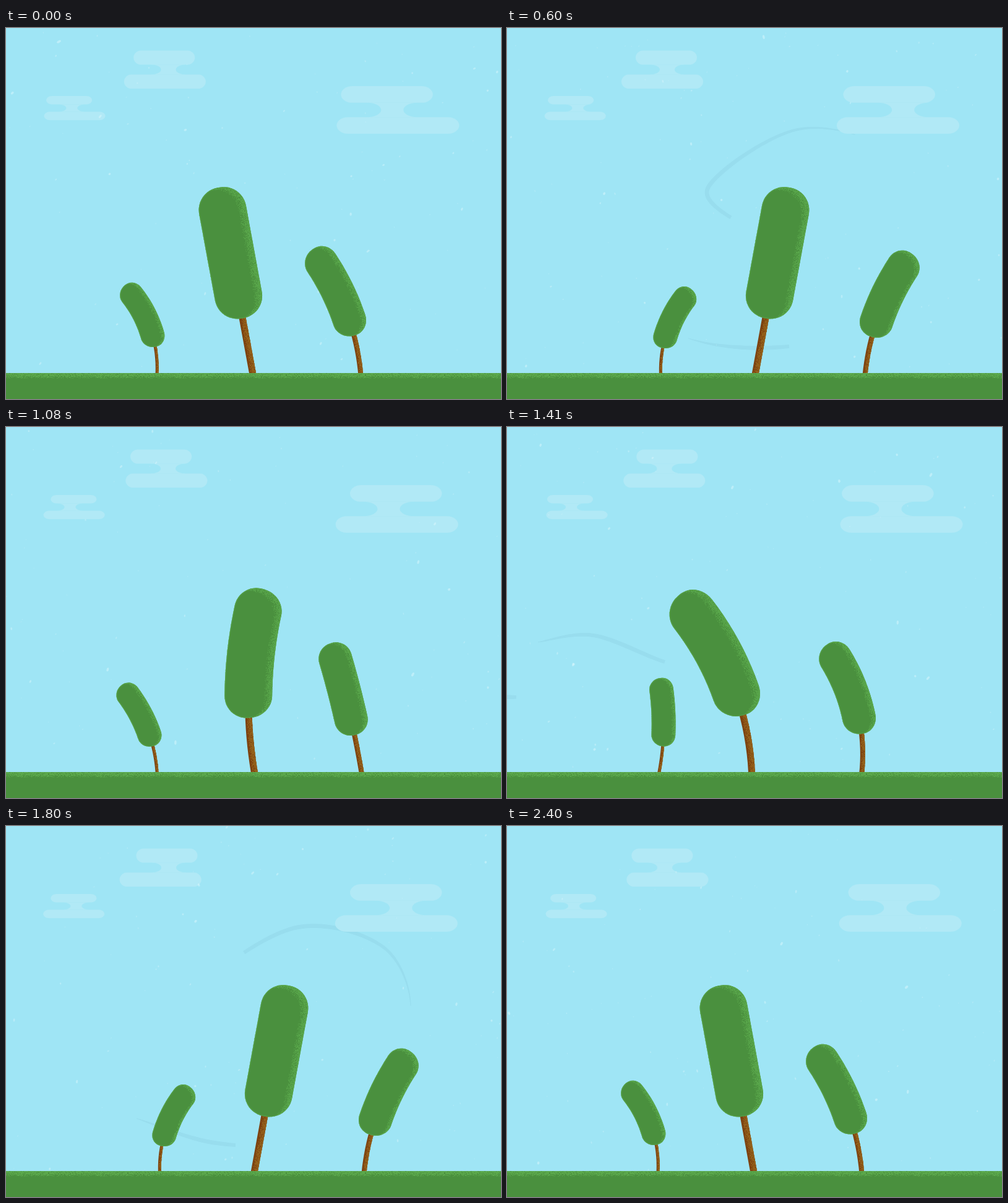
An HTML page with a canvas for the animation above (2.43 s loop, 800 by 600 pixels).

```html
<!DOCTYPE html>
<html lang="en">
<head>
<meta charset="utf-8">
<title>Trees in the wind</title>
<style>
html, body { margin: 0; width: 100%; height: 100%; overflow: hidden; background: #9fe5f5; }
canvas { display: block; width: 800px; height: 600px; }
</style>
</head>
<body>
<canvas id="stage" width="800" height="600"></canvas>
<script>
const ctx = document.getElementById('stage').getContext('2d');
const LOOP = 2430, STEP = 30, SWAY = 1200, GUST = 1270, DUST_HOLD = 120, HORIZON = 558;
const SKY = '#9fe5f5', CLOUD = '#b1e9f6', WIND = '#98ddee';
const GREEN = '#4a903e', LIGHT = '#5ba84c', BARK = '#7d4210', BARK_LIGHT = '#93601a';
const RAD = Math.PI / 180, TAU = 2 * Math.PI;

function rng(seed) {
  let a = seed * 7919 + 17;
  return () => {
    a = (a + 0x6d2b79f5) | 0;
    let n = Math.imul(a ^ (a >>> 15), 1 | a);
    n = (n + Math.imul(n ^ (n >>> 7), 61 | n)) ^ n;
    return ((n ^ (n >>> 14)) >>> 0) / 4294967296;
  };
}

function polygon(pts) {
  const p = new Path2D();
  for (const [x, y] of pts) p.lineTo(x, y);
  p.closePath();
  return p;
}

// Grain tiles: sparse one-pixel dots that build up when layered.
function grain(color) {
  return Array.from({ length: 10 }, (_, i) => {
    const tile = document.createElement('canvas'), rand = rng(i + 1);
    tile.width = tile.height = 128;
    const g = tile.getContext('2d');
    g.fillStyle = color;
    for (let y = 0; y < 128; y++)
      for (let x = 0; x < 128; x++)
        if (rand() < 0.2) g.fillRect(x, y, 1, 1);
    return ctx.createPattern(tile, 'repeat');
  });
}
const leafGrain = grain(LIGHT), barkGrain = grain(BARK_LIGHT);

// Clouds: top bar, bottom bar and neck each drift on their own wave.
const wave = (mid, amp, period, peak) => t => mid + amp * Math.cos(TAU * (t - peak) / period);
const driftA = { top: wave(5, 7.5, 735, 1065), bottom: wave(-1, 4.5, 1150, 270), neck: wave(1, 13, 1520, 470) };
const driftB = { top: wave(8, 9, 1300, 330), bottom: wave(-10.5, 7.5, 1300, 1080), neck: wave(3.5, 8, 1060, 890) };
const clouds = [
  { x: 543.5, y: 94, sx: 1, sy: 1, thick: 26.8, drift: driftA },
  { x: 201, y: 36.5, sx: 0.667, sy: 0.8, thick: 28.5, drift: driftB },
  { x: 66, y: 110, sx: 0.5, sy: 0.506, thick: 26.8, drift: driftA }
];

function bar(x, y, w, h) {
  const rx = 18, ry = h / 2;
  ctx.beginPath();
  ctx.ellipse(x + rx, y + ry, rx, ry, 0, TAU / 4, TAU * 0.75);
  ctx.ellipse(x + w - rx, y + ry, rx, ry, 0, -TAU / 4, TAU / 4);
  ctx.fill();
}

function drawCloud({ x, y, sx, sy, thick, drift }, t) {
  const neck = 66.5 + drift.neck(t), ry = 38.7 - thick;
  ctx.save();
  ctx.translate(x, y);
  ctx.scale(sx, sy);
  ctx.fillStyle = CLOUD;
  bar(drift.top(t), 0, 148.5, thick);
  bar(drift.bottom(t) - 8.5, 77 - thick, 198, thick);
  ctx.beginPath();
  ctx.ellipse(neck - 24, 38.5, 24, ry, 0, -TAU / 4, TAU / 4);
  ctx.ellipse(neck + 60, 38.5, 24, ry, 0, TAU / 4, TAU * 0.75);
  ctx.fill();
  ctx.restore();
}

// Wind: a tapered streak runs along a curve whose points are evenly spaced in time.
const GUST_START = 20, GUST_LENGTH = 135;
const gusts = [
  {
    pace: 60,
    path: [[50, 348], [140, 337], [255, 380], [345, 402], [450, 415], [540, 401],
      [650, 320], [615, 200], [470, 164], [325, 258], [385, 322]]
  },
  {
    pace: 120,
    path: [[-60, 436], [15, 437], [85, 442], [195, 468], [335, 512], [480, 512], [620, 470]]
  }
];

function onCurve(pts, u) {
  const last = pts.length - 1, i = Math.min(Math.floor(u), last - 1), f = u - i;
  const p = k => pts[Math.max(0, Math.min(last, i + k))];
  return [0, 1].map(d => {
    const a = p(-1)[d], b = p(0)[d], c = p(1)[d], e = p(2)[d];
    return b + f / 2 * (c - a + f * (2 * a - 5 * b + 4 * c - e + f * (3 * (b - c) + e - a)));
  });
}

function drawGust({ pace, path }, t) {
  const at = time => Math.max(0, Math.min(path.length - 1, (time - GUST_START) / pace));
  const head = at(t), tail = at(t - GUST_LENGTH), n = 48;
  if (head === tail) return;
  const pts = Array.from({ length: n + 1 }, (_, i) => onCurve(path, tail + (head - tail) * i / n));
  const left = [], right = [];
  pts.forEach(([x, y], i) => {
    const a = pts[Math.max(0, i - 1)], b = pts[Math.min(n, i + 1)];
    const dx = b[0] - a[0], dy = b[1] - a[1], len = Math.hypot(dx, dy) || 1;
    const w = 0.5 + 2.9 * Math.sin(i / n * 2.2);
    left.push([x - dy / len * w, y + dx / len * w]);
    right.unshift([x + dy / len * w, y - dx / len * w]);
  });
  ctx.fillStyle = WIND;
  ctx.fill(polygon(left.concat(right)));
}

// Dust over the sky, reshuffled every few steps.
function drawDust(t) {
  const rand = rng(40 + Math.floor(t / DUST_HOLD));
  for (let i = 0; i < 100; i++) {
    const size = 0.6 + 1.3 * rand() ** 3;
    ctx.fillStyle = `rgba(235,252,255,${0.12 + 0.15 * size})`;
    ctx.beginPath();
    ctx.ellipse(rand() * 800, rand() * 556, size, size * (1 + rand()), rand() * 1.6 - 0.4, 0, TAU);
    ctx.fill();
  }
}

// Trees: the spine is an arc with a swaying base angle and curvature.
const trees = [
  { x: 246.2, k: 0.5, lag: 90, bend: 0.3, stem: 61, leaf: 70.7, half: 19.4, trunk: 5, give: 0.024 },
  { x: 576, k: 0.7, lag: 46, bend: 0.205, stem: 87.5, leaf: 98.8, half: 27, trunk: 8, give: 0.025 },
  { x: 400, k: 1, lag: 0, bend: 0.141, stem: 128.5, leaf: 138, half: 38.5, trunk: 11, give: 0.036 }
];

// Maps (distance along the spine, sideways offset) to the stage.
function spine({ x, k, lag, bend, give }, t) {
  const a = TAU * t / SWAY + lag * RAD, c = Math.cos(a), s = Math.sin(a);
  const x0 = x - k * (1.5 * c + 4.3 * s);
  const lean = (1 - k - 10.4 * c + 2 * s) * RAD, curve = -bend * s * RAD, stretch = 1 + give * s;
  return (d, off) => {
    const len = d * stretch, h = curve * len / 2, mid = lean + h, end = mid + h;
    const chord = Math.abs(h) < 1e-6 ? len : len * Math.sin(h) / h;
    return [
      x0 + chord * Math.sin(mid) + off * Math.cos(end),
      HORIZON - chord * Math.cos(mid) + off * Math.sin(end)
    ];
  };
}

function strip(at, from, to, o1, o2) {
  const left = [], right = [];
  for (let i = 0; i <= 10; i++) {
    const d = from + (to - from) * i / 10;
    left.push(at(d, o1));
    right.unshift(at(d, o2));
  }
  return polygon(left.concat(right));
}

function crown(at, { half, stem, leaf }) {
  const r = half * 0.95, flat = half - r, lo = stem - flat, hi = stem + leaf + flat, pts = [];
  const corner = (d, off, from) => {
    for (let a = from; a <= from + 90; a += 7.5)
      pts.push(at(d + r * Math.sin(a * RAD), off + r * Math.cos(a * RAD)));
  };
  const side = (from, to, off) => {
    for (let i = 1; i < 10; i++) pts.push(at(from + (to - from) * i / 10, off));
  };
  corner(hi, flat, 0);
  corner(hi, -flat, 90);
  side(hi, lo, -half);
  corner(lo, -flat, 180);
  corner(lo, flat, 270);
  side(lo, hi, half);
  return polygon(pts);
}

function drawTree(tree, t) {
  const at = spine(tree, t), w = tree.trunk / 2;
  ctx.fillStyle = BARK;
  ctx.fill(strip(at, -14, tree.stem, -w, w));
  barkGrain.forEach((tile, i) => {
    ctx.fillStyle = tile;
    ctx.fill(strip(at, -14, tree.stem, w * (0.8 - i * 0.16), w));
  });

  const leaf = crown(at, tree), depth = tree.half * 0.34;
  ctx.fillStyle = GREEN;
  ctx.fill(leaf);
  ctx.save();
  ctx.clip(leaf);
  ctx.strokeStyle = LIGHT;
  ctx.globalAlpha = 0.45;
  ctx.lineWidth = 3;
  ctx.stroke(leaf);
  ctx.globalAlpha = 0.75;
  leafGrain.forEach((tile, i) => {
    const d = depth * ((i + 1) / 10) ** 1.3, rim = new Path2D(leaf);
    rim.addPath(leaf, { e: -d, f: d * 0.4 });
    ctx.fillStyle = tile;
    ctx.fill(rim, 'evenodd');
  });
  ctx.restore();
}

function drawGround() {
  ctx.fillStyle = GREEN;
  ctx.fillRect(0, HORIZON, 800, 42);
  leafGrain.forEach((tile, i) => {
    ctx.fillStyle = tile;
    ctx.fillRect(0, HORIZON, 800, 1 + i * 0.85);
  });
}

function draw(t) {
  ctx.fillStyle = SKY;
  ctx.fillRect(0, 0, 800, 600);
  for (const g of gusts) drawGust(g, t % GUST);
  for (const c of clouds) drawCloud(c, t);
  drawDust(t);
  for (const tree of trees) drawTree(tree, t);
  drawGround();
}

const start = performance.now();
function tick() {
  const t = (performance.now() - start) % LOOP;
  draw(Math.floor(t / STEP) * STEP);
  requestAnimationFrame(tick);
}
tick();
</script>
</body>
</html>
```
